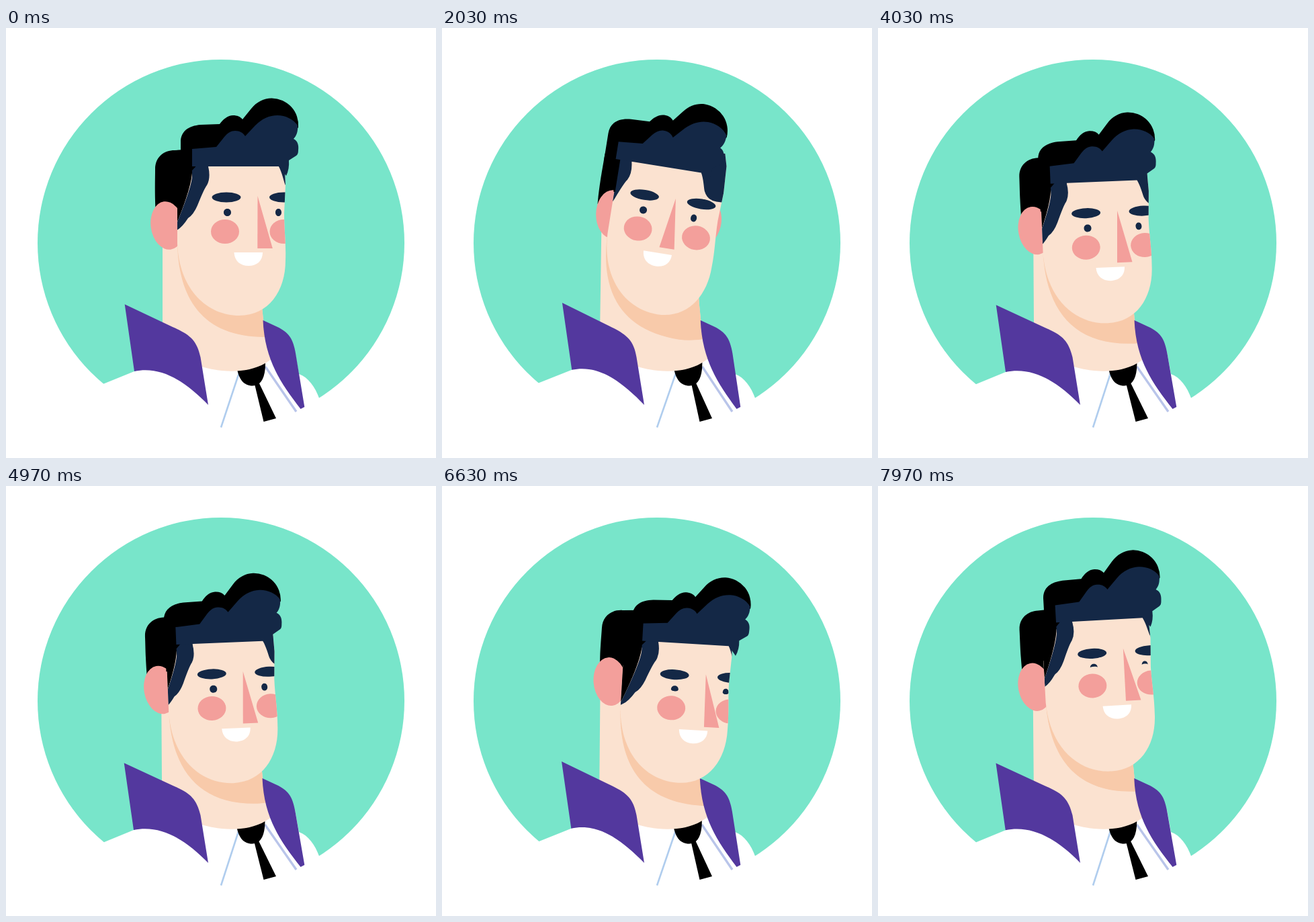
Write an HTML page that moves like this. It is 640x640 px and loops after 8000 ms.

```html
<!DOCTYPE html>
<html lang="en">
<head>
<meta charset="utf-8">
<title>Portrait</title>
<style>
  html, body { margin: 0; width: 100%; height: 100%; overflow: hidden; background: #fff; }
  svg { display: block; width: 100vw; height: 100vh; }
  .skin { fill: #fbe2d0; }
  .shade { fill: #f8caaa; }
  .pink { fill: #f39f9b; }
  .navy { fill: #142846; }
  .white { fill: #fff; }
  .coat { fill: #53389e; }
  .line { fill: none; }
</style>
</head>
<body>
<svg viewBox="0 0 640 640">
  <defs>
    <clipPath id="neckClip"><path id="neckCut"/></clipPath>
    <clipPath id="faceClip"><path id="faceCut"/></clipPath>
  </defs>
  <circle cx="320" cy="320" r="273" fill="#78e5ca"/>

  <path id="shirt" class="white"/>
  <path id="seamL" class="line" stroke="#b0cdee" stroke-width="2.6"/>
  <path id="seamR" class="line" stroke="#b9c5ea" stroke-width="3.4"/>
  <path id="tie"/>
  <path id="knot" d="M344 508V495H386V500C386 521 379 532.500 367 532.500C354 532.500 347 523 344 508Z"/>
  <path id="neck" class="skin"/>
  <g clip-path="url(#neckClip)">
    <g id="shadeHead">
      <path id="shade" class="shade" d="M-46 105C-47 195 -10 254 84 254Q115 253 150 235V120H-46Z"/>
    </g>
  </g>
  <path id="lapelL" class="coat"/>
  <path id="lapelR" class="coat"/>

  <g id="head">
    <path id="back" d="M-78 75C-80 40 -79 20 -79 4C-79 -14 -66 -24 -50 -24L-20 -26V75Z"/>
    <g id="ears" class="pink">
      <ellipse cx="-61" cy="88" rx="24.500" ry="36" transform="rotate(-8 -61 88)"/>
      <ellipse cx="76" cy="79" rx="25" ry="36" transform="rotate(4 76 79)"/>
    </g>
    <path id="face" class="skin"/>
    <g clip-path="url(#faceClip)">
      <path d="M0 -60V10H-24Q-26 35 -50 92L-95 90V-60Z"/>
      <path class="navy" d="M-24 -26H0V0Q4 17 -2 28Q-6 33 -16 58Q-22 72 -30 77Q-39 91 -47 95L-56 100L-50 92Q-26 35 -24 16Z"/>
      <path class="navy" d="M105 -60V0C110 10 112 20 114 26Q120 39 134 39L160 38V-60Z"/>
      <g id="brows" class="navy">
        <ellipse cx="27" cy="46" rx="21.500" ry="7.500"/>
        <ellipse cx="112.500" cy="46" rx="21.500" ry="7.500"/>
      </g>
      <path id="eyes" class="navy"/>
      <g class="pink">
        <ellipse cx="25" cy="97" rx="21" ry="18"/>
        <ellipse cx="112.500" cy="97" rx="21" ry="18"/>
        <path id="nose"/>
      </g>
      <path class="white" d="M38.500 128H81C81 141 72 148 60 148C48 148 39 141 38.500 128Z"/>
    </g>
    <path id="edge" class="line" stroke="#000" stroke-width="2.500" d="M-20 -30L-46 -10V52"/>
    <path d="M-41 6V-36C-41 -52 -30 -60.500 -11 -62L17 -63C22 -70 29 -76 37 -76C43 -76 48 -74 51 -70L64 -86C72 -96 83 -101.500 94.500 -101.500A40 40 0 0 1 134 -58L120 -40L0 -20L-24 6Z"/>
    <path class="navy" d="M-24 -26L12 -29L24 -44C29 -50 34 -53 40 -53C47 -53 52 -50 55 -45L70 -61C80 -71 91 -76 103 -76C115 -76 127 -70 133 -61C134 -52 131 -45 127 -41C133 -38 135 -32 134 -24Q134 -18 131 -16L120 -9Q121 4 116 14L105 0H-24Z"/>
  </g>
</svg>
<script>
const LOOP = 8000;
const $ = id => document.getElementById(id);

// Head poses; x and y place the left end of the hairline.
const home  = { x: 301,   y: 206,   tilt: 0,    turn: 0,    nod: 0 };
const front = { x: 283.5, y: 197.2, tilt: 9.1,  turn: 43,   nod: -5.2 };
const low   = { x: 280.8, y: 230.7, tilt: -2.4, turn: 10.3, nod: -19.2 };
const far   = { x: 322,   y: 232,   tilt: 3.4,  turn: -7,   nod: -24.8 };
const high  = { x: 289,   y: 202,   tilt: -3.2, turn: 0,    nod: 6 };

// Each pose is held from..to while it sinks slowly; holds are joined by eased turns.
const HOLDS = [
  { pose: home,  from: 0,    to: 0,    at: 0 },
  { pose: front, from: 900,  to: 2130, at: 1680 },
  { pose: home,  from: 2560, to: 2560, at: 2560 },
  { pose: low,   from: 3200, to: 5090, at: 4000 },
  { pose: far,   from: 5920, to: 6780, at: 6630 },
  { pose: high,  from: 7900, to: LOOP, at: 7970 }
];
const SINK = { x: -3.5, y: 4.5, nod: -2.5 }; // per second
const BLINKS = [6715, 7997];

const ease = u => u * u * (3 - 2 * u);

function poseAt(t) {
  const next = HOLDS.findIndex(h => t < h.from);
  const b = HOLDS[next < 0 ? HOLDS.length - 1 : next];
  const a = next < 0 ? b : HOLDS[next - 1];
  const k = t <= a.to ? 0 : ease((t - a.to) / (b.from - a.to));
  const held = (h, key) => h.pose[key] + (SINK[key] || 0) * (t - h.at) / 1000;
  const pose = {};
  for (const key in home) pose[key] = held(a, key) * (1 - k) + held(b, key) * k;
  return pose;
}

const blinkAt = t => Math.max(0, ...BLINKS.map(c => 1.3 * (1 - Math.abs(t - c) / 120)));
const move = (id, x, y) => $(id).setAttribute('transform', `translate(${x} ${y})`);
const draw = (id, d) => $(id).setAttribute('d', d);

const FACE = 'M-46 -10L-20 -30H108L113 -12L114 8L115 28L113 70C113 95 116 115 115 140' +
  'C115 185 90 222 46 222C0 222 -43 185 -46 115Z';
draw('face', FACE);
draw('faceCut', FACE);

// The lower rim of the eye rises past the middle, leaving an arch.
function eye(cx, r, blink) {
  const rim = 7.3 - 9.3 * Math.min(blink, 1.1);
  return `M${cx - r} ${68.5 + 1.5 * blink}c0 -7.3 ${2 * r} -7.3 ${2 * r} 0c0 ${rim} ${-2 * r} ${rim} ${-2 * r} 0Z`;
}

function drawBody(w) {
  const v = w * .6;
  draw('shirt', `M100 ${548 - w}L${191 + w} ${511 - w}L240 488L290 490L345 505L393 490L430 482` +
    `L436 515C450 520 460 534 466.500 552L490 640H100Z`);
  const neck = `M${233 + 2 * w} 290L${233 + w} 440L275 470L291 504C325 514 368 515 396 492` +
    `L${388 + w} 470L${383 + w} 435L${380.5 + w} 410L375 290Z`;
  draw('neck', neck);
  draw('neckCut', neck);
  draw('seamL', `M${347 + v} 513L320 594.500`);
  draw('seamR', `M${386 + v} 504L432 571`);
  draw('tie', `M${369.5 + v} 528L383.500 586L402 581L${376.5 + v} 528Z`);
  move('knot', v, 0);
  draw('lapelL', `M${176.7 + w} ${411.3 - w}L${248 + v} ${445 - v}` +
    `C${273 + v} 456 ${284 + v} 464 289.500 490L301 561` +
    `C265 524 ${230 + w} ${503 - w} ${191 + w} ${511 - w}Z`);
  draw('lapelR', `M${382.5 + w} 435L${403 + w} 444.500C${421 + v} 453 ${427 + v} 462 ${431 + v} 484` +
    `L444.300 564L438.500 567C${410 + v} 530 ${385 + w} 495 ${382.5 + w} 435Z`);
}

function render(t) {
  const { x, y, tilt, turn, nod } = poseAt(t);
  const blink = blinkAt(t);
  const place = `translate(${x} ${y}) rotate(${tilt})`;
  $('head').setAttribute('transform', place);
  $('shadeHead').setAttribute('transform', place);
  for (const id of ['face', 'faceCut', 'shade', 'edge']) move(id, turn * .64, nod * .58);
  move('back', turn * .88, nod * .8);
  move('ears', turn * 1.05, nod);
  move('brows', 0, 3 * blink);
  draw('eyes', eye(28.5, 5.5, blink) + eye(104.5, 4.5, blink));
  draw('nose', `M73.500 44L${73.3 - turn * .29} ${122 - turn * .06}h22.500Z`);
  drawBody(2.4 * Math.tanh(tilt / 5.5));
}

let start = null;
function tick(now) {
  if (start === null) start = now;
  render((now - start) % LOOP);
  requestAnimationFrame(tick);
}
render(0);
requestAnimationFrame(tick);
</script>
</body>
</html>
```
